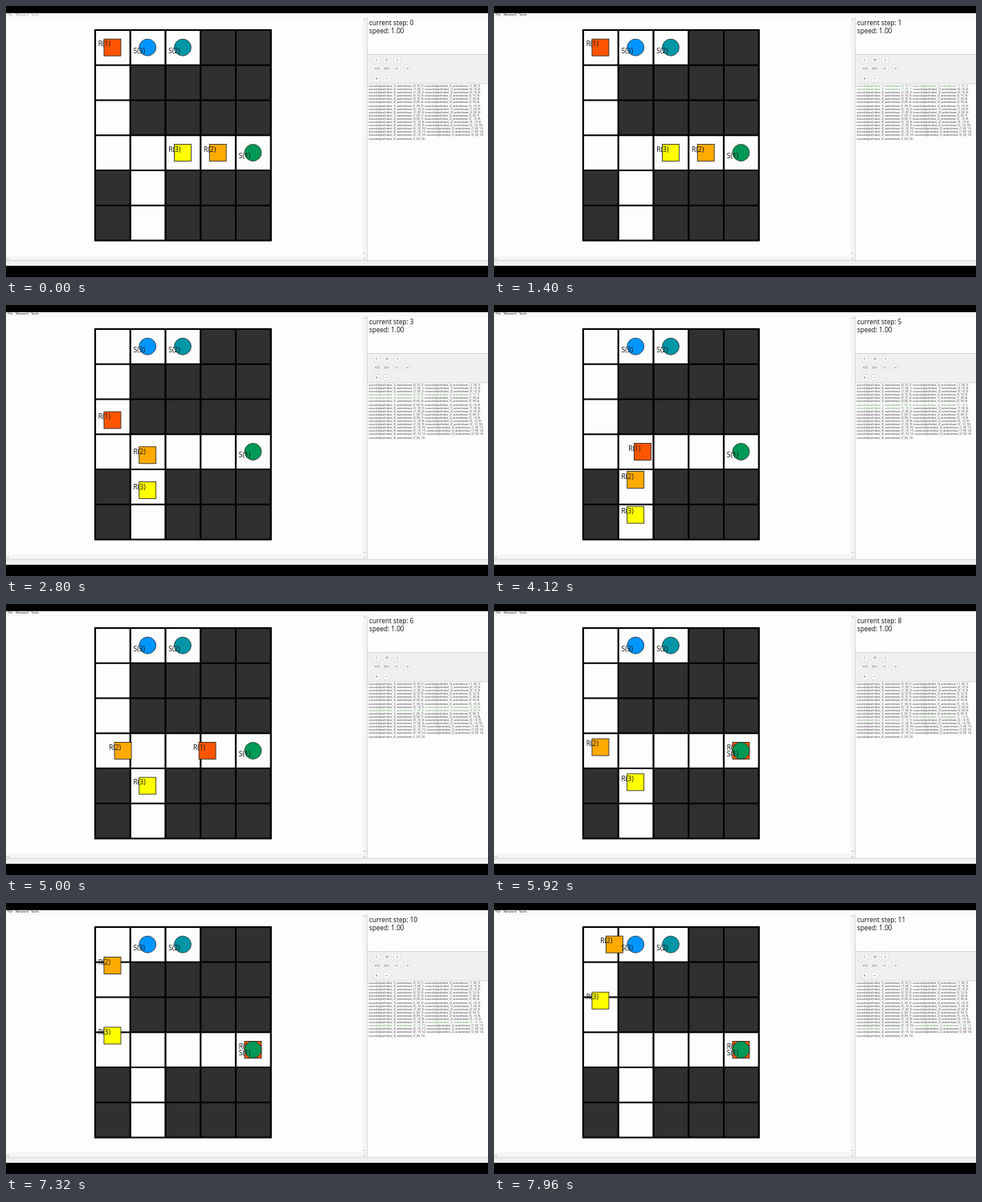
Write an HTML page that moves like this. It is 600 by 338 pixels and loops after 8 s.

```html
<!DOCTYPE html>
<html lang="en">
<head>
<meta charset="utf-8">
<title>Robot plan viewer</title>
<style>
html, body { margin: 0; width: 100%; height: 100%; overflow: hidden; background: #000; }
svg { position: absolute; left: 0; top: 0; }
text, #plan { font-family: "Noto Sans", sans-serif; }
#plan { position: absolute; left: 451.5px; top: 98px; width: 146px; font-size: 3.2px; line-height: 4.1px; color: #333; }
#plan .now { color: #5a8f55; }
</style>
</head>
<body>
<svg id="stage" width="600" height="338" viewBox="0 0 600 338"></svg>
<div id="plan"></div>
<script>
const NS = "http://www.w3.org/2000/svg";
const LOOP = 8000, FIRST = 1392, PERIOD = 622, PAUSE = 102, TICK = 52, PLAY = 720;
const CELL = 43.75, LEFT = 111, TOP = 30;
const DIRS = { U: [0, -1], D: [0, 1], L: [-1, 0], R: [1, 0], ".": [0, 0] };
const FLOOR = ["11100", "10000", "10000", "11111", "01000", "01000"];
const stage = document.getElementById("stage");
const planBox = document.getElementById("plan");

function add(tag, attrs, parent = stage) {
  const el = document.createElementNS(NS, tag);
  for (const key in attrs) el.setAttribute(key, attrs[key]);
  parent.appendChild(el);
  return el;
}
const rect = (x, y, width, height, fill, parent) => add("rect", { x, y, width, height, fill }, parent);
const path = (d, stroke = "#888", width = 0.6, parent = stage) =>
  add("path", { d, stroke, "stroke-width": width, fill: "none" }, parent);
function label(x, y, size, str, parent) {
  const el = add("text", { x, y, "font-size": size, fill: "#1c1c1c" }, parent);
  el.textContent = str;
  return el;
}
const centre = (c, r) => [LEFT + (c + 0.5) * CELL - 0.4, TOP + (r + 0.5) * CELL - 0.2];

// Window frame
rect(0, 0, 600, 338, "#000");
rect(0, 9, 600, 315, "#f0f0f0");
rect(0, 9, 600, 5, "#fdfdfd");
rect(0, 14, 444, 297.5, "#fefdfe");
rect(444, 14, 5, 304, "#f6f6f6");
rect(0, 311.5, 449, 6, "#f6f6f6");
rect(450, 14, 150, 46, "#fefdfe");
rect(450, 97, 150, 220, "#fefdfe");
path("M0 14H600", "#ececec", 0.7);
path("M449.5 14V317M0 317.3H600M450 60.5H600M450 97H600", "#cbcbcb", 0.7);
path("M445.5 17l1-1 1 1M445.5 308l1 1 1-1M445.5 314l1 1-1 1M3 314l-1 1 1 1", "#777", 0.6);
const menu = add("g", {});
[[2, "File"], [12, "Network"], [31, "Tools"]].forEach(([x, s]) => label(x, 12.3, 4, s, menu));

// Board
FLOOR.forEach((row, r) => [...row].forEach((open, c) =>
  rect(LEFT + c * CELL, TOP + r * CELL, CELL, CELL, open === "1" ? "#fefdfe" : "#322f32")));
let grid = "";
for (let c = 0; c <= 5; c++) grid += `M${LEFT + c * CELL} ${TOP - 1}v${6 * CELL + 2}`;
for (let r = 0; r <= 6; r++) grid += `M${LEFT - 1} ${TOP + r * CELL}h${5 * CELL + 2}`;
path(grid, "#000", 2.2);

// Pieces
const robots = [
  { id: 1, from: [0, 0], plan: "DDDRRRR", fill: "#ff5500" },
  { id: 2, from: [3, 3], plan: "LLD.UL.UUURR.", fill: "#ffaa00" },
  { id: 3, from: [2, 3], plan: "LDD.U..ULUUUR", fill: "#ffff00" }
];
for (const bot of robots) {
  bot.g = add("g", {});
  add("rect", { x: -10.5, y: -10.5, width: 21, height: 21, fill: bot.fill, stroke: "#222", "stroke-width": 0.8 }, bot.g);
  label(-17.7, -1.3, 8.5, `R(${bot.id})`, bot.g);
}
[[1, 4, 3, "#009955"], [2, 2, 0, "#0096a5"], [3, 1, 0, "#0095ff"]].forEach(([id, c, r, fill]) => {
  const g = add("g", { transform: `translate(${centre(c, r)})` });
  add("circle", { r: 10.5, fill, stroke: "#222", "stroke-width": 0.7 }, g);
  label(-17.7, 7, 8.5, `S(${id})`, g);
});

// Side panel
const stepText = label(452, 23.8, 8.15, "");
label(452, 33.8, 8.15, "speed: 1.00");
const button = (x, y) => add("rect", { x: x - 4, y: y - 4, width: 8, height: 8, rx: 0.8, fill: "#f8f8f8", stroke: "#dadada", "stroke-width": 0.6 });
[[461.5, 67], [474, 67], [487, 67], [461, 78], [474, 78], [486.5, 78], [499.5, 78], [461.5, 90.5], [474, 90.5]]
  .forEach(([x, y]) => button(x, y));
path("M462.5 65.5l-2 1.5 2 1.5M486 65.5l2 1.5-2 1.5");
path("M461 76.5l-2 1.5 2 1.5zM464 76.5l-2 1.5 2 1.5zM471.5 76.5l2 1.5-2 1.5zM474.5 76.5l2 1.5-2 1.5z");
path("M485 76.5v3M488 76.5l-2 1.5 2 1.5M501 76.5v3M498 76.5l2 1.5-2 1.5");
path("M460 90.5h3M461.5 89v3M472.7 90.5h2.6");
const playIcon = path("M473 65.3l2.5 1.7-2.5 1.7z");
const pauseIcon = path("M473.2 65.5v3M475 65.5v3", "#777", 0.8);

// Plan listing
const actions = [];
for (let step = 1; step <= 13; step++) {
  for (const bot of robots) {
    if (step > bot.plan.length) continue;
    const [dx, dy] = DIRS[bot.plan[step - 1]];
    const el = document.createElement("span");
    el.textContent = `occurs(object(robot, ${bot.id}), action(move, (${dx}, ${dy})), ${step}). `;
    planBox.appendChild(el);
    actions.push({ step, el });
  }
}

function place(bot, step, part) {
  let [x, y] = bot.from;
  for (let i = 1; i <= step; i++) {
    const [dx, dy] = DIRS[bot.plan[i - 1] || "."];
    const k = i < step ? 1 : part;
    x += dx * k;
    y += dy * k;
  }
  bot.g.setAttribute("transform", `translate(${centre(x, y)})`);
}

function draw(t) {
  const since = t - FIRST;
  const step = since < 0 ? 0 : Math.floor(since / PERIOD) + 1;
  const local = since - (step - 1) * PERIOD - PAUSE;
  const part = step ? Math.min(10, Math.max(0, Math.floor(local / TICK))) / 10 : 0;
  robots.forEach(bot => place(bot, step, part));
  stepText.textContent = `current step: ${step}`;
  actions.forEach(a => { a.el.className = a.step === step ? "now" : ""; });
  const playing = t >= PLAY;
  menu.setAttribute("opacity", playing ? 1 : 0.5);
  playIcon.setAttribute("opacity", playing ? 0 : 1);
  pauseIcon.setAttribute("opacity", playing ? 1 : 0);
}

const start = performance.now();
function frame() {
  draw((performance.now() - start) % LOOP);
  requestAnimationFrame(frame);
}
draw(0);
requestAnimationFrame(frame);
</script>
</body>
</html>
```
